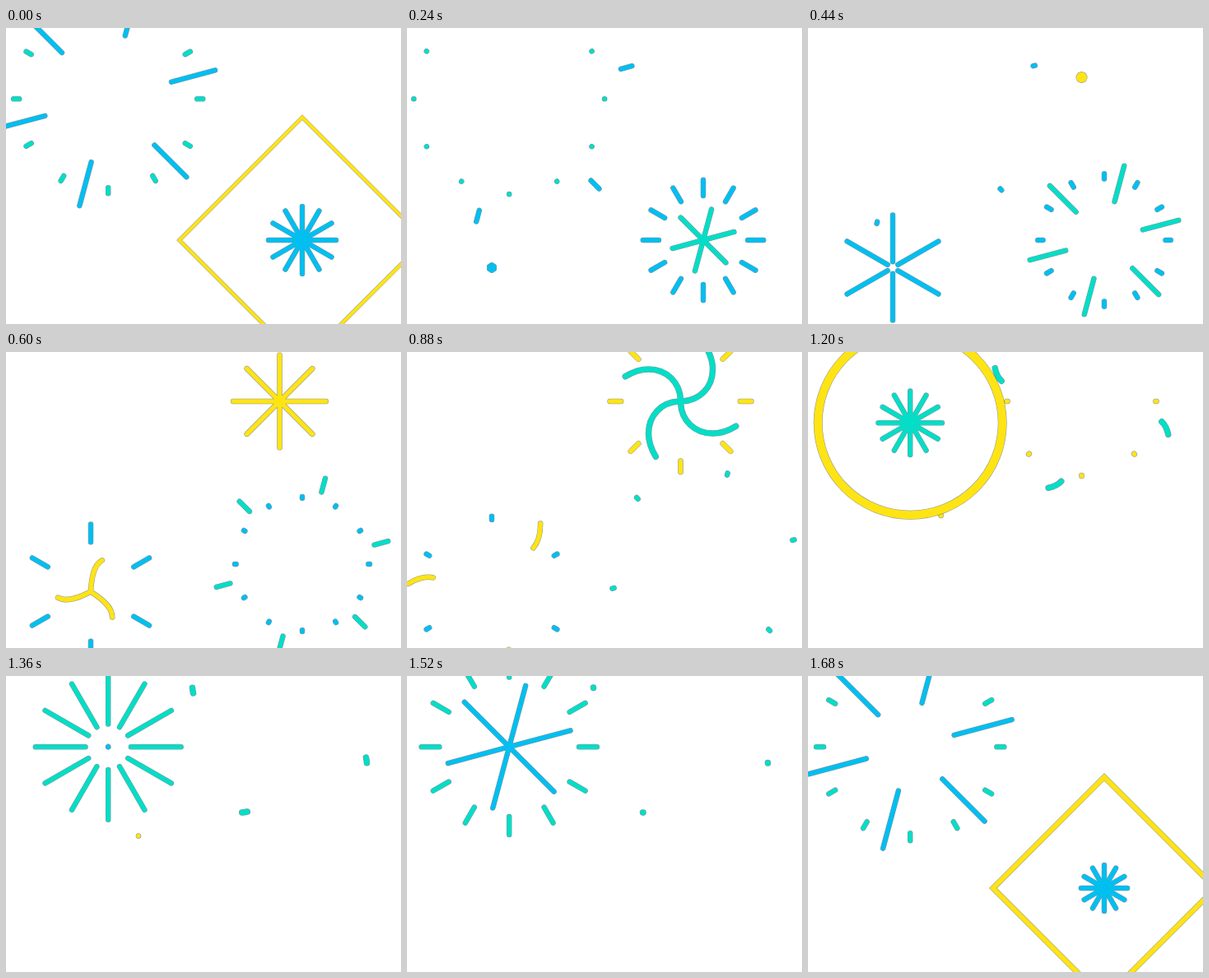
Write an HTML page with a canvas that moves like this. It is 480x360 px and loops after 1.72 s.

```html
<!DOCTYPE html>
<html lang="en">
<head>
<meta charset="utf-8">
<title>Fireworks</title>
<style>
  html, body { margin: 0; width: 100%; height: 100%; overflow: hidden; background: #fff; }
  canvas { display: block; }
</style>
</head>
<body>
<canvas id="stage" width="480" height="360"></canvas>
<script>
const ctx = document.getElementById('stage').getContext('2d');
const LOOP = 1720, STEP = 40;
const DRAW = 760;          // time for one end of a stroke to run along its path
const SECOND = 281;        // delay of the second burst
const SHELL = 280;         // life of the expanding outline
const YELLOW = '#ffe414', BLUE = '#02bff0', TEAL = '#04dec6';
const EDGE = 'rgba(24, 36, 64, 0.5)';   // thin dark rim around every stroke

function burst(count, angle, path, color, { delay = 0, lag = 180, width = 5.5 } = {}) {
  const node = document.createElementNS('http://www.w3.org/2000/svg', 'path');
  node.setAttribute('d', path);
  const length = node.getTotalLength();
  return { count, angle, color, delay, lag, width, length, path: new Path2D(path) };
}
const ray = radius => `M0 0H${radius}`;

const fireworks = [
  { x: 360, y: 258, start: 1548,
    shell: { sides: 4, radius: 158.5, width: 12.5 },
    bursts: [
      burst(12, 0, ray(82), BLUE),
      burst(6, -15, ray(114.5), TEAL, { delay: SECOND })
    ] },
  { x: 103, y: 291.5, start: 190,
    bursts: [
      burst(6, -90, ray(92), BLUE),
      burst(3, 0, 'M0 0C1 -22 5 -36 18 -40C38 -44 65 -46 58 -97', YELLOW, { delay: SECOND, lag: 185 })
    ] },
  { x: 332.5, y: 60, start: 386,
    bursts: [
      burst(8, 0, ray(91), YELLOW),
      burst(4, 0, 'M0 0C0 22 16 39 39 39C64 39 73 21.5 88 21C98 21 105 32 106 46', TEAL,
        { delay: SECOND, width: 6.5 })
    ] },
  { x: 124.2, y: 86.2, start: 1070,
    shell: { radius: 132.4, width: 20.5 },
    bursts: [
      burst(12, 0, ray(116), TEAL),
      burst(6, -15, ray(157), BLUE, { delay: SECOND, lag: 195 })
    ] }
];

// Cubic-bezier ease (.24, 0, .03, 1)
function ease(p) {
  if (p <= 0) return 0;
  if (p >= 1) return 1;
  let low = 0, high = 1, u = 0.5;
  for (let i = 0; i < 24; i++) {
    u = (low + high) / 2;
    const v = 1 - u;
    const x = 0.72 * u * v * v + 0.09 * u * u * v + u * u * u;
    if (x < p) low = u; else high = u;
  }
  return u * u * (3 - 2 * u);
}

function strokeRimmed(path, width, color) {
  ctx.lineWidth = width + 1;
  ctx.strokeStyle = EDGE;
  ctx.stroke(path);
  ctx.lineWidth = width;
  ctx.strokeStyle = color;
  ctx.stroke(path);
}

function drawShell({ sides, radius, width }, age) {
  const lineWidth = width * (1 - age / 250);
  if (lineWidth <= 0) return;
  const r = radius * (1 - (1 - age / SHELL) ** 3);
  const outline = new Path2D();
  if (sides) {
    for (let i = 0; i < sides; i++) {
      const a = i * 2 * Math.PI / sides;
      outline.lineTo(r * Math.cos(a), r * Math.sin(a));
    }
    outline.closePath();
  } else {
    outline.arc(0, 0, r, 0, 2 * Math.PI);
  }
  strokeRimmed(outline, lineWidth, YELLOW);
}

function drawBurst(b, age) {
  const head = ease((age - b.delay) / DRAW);
  const tail = ease((age - b.delay - b.lag) / DRAW);
  if (head - tail < 0.0008) return;
  ctx.save();
  ctx.lineCap = 'round';
  ctx.setLineDash([(head - tail) * b.length, b.length * 2]);
  ctx.lineDashOffset = -tail * b.length;
  const rays = new Path2D();
  for (let i = 0; i < b.count; i++) {
    rays.addPath(b.path, new DOMMatrix().rotate(b.angle + i * 360 / b.count));
  }
  strokeRimmed(rays, b.width, b.color);
  ctx.restore();
}

function render(time) {
  ctx.fillStyle = '#fff';
  ctx.fillRect(0, 0, 480, 360);
  for (const f of fireworks) {
    const age = (time - f.start + LOOP) % LOOP;
    ctx.save();
    ctx.translate(f.x, f.y);
    if (f.shell) drawShell(f.shell, age);
    for (const b of f.bursts) drawBurst(b, age);
    ctx.restore();
  }
}

const origin = performance.now();
function tick() {
  const elapsed = (performance.now() - origin) % LOOP;
  render(Math.floor(elapsed / STEP) * STEP);
  requestAnimationFrame(tick);
}
tick();
</script>
</body>
</html>
```
